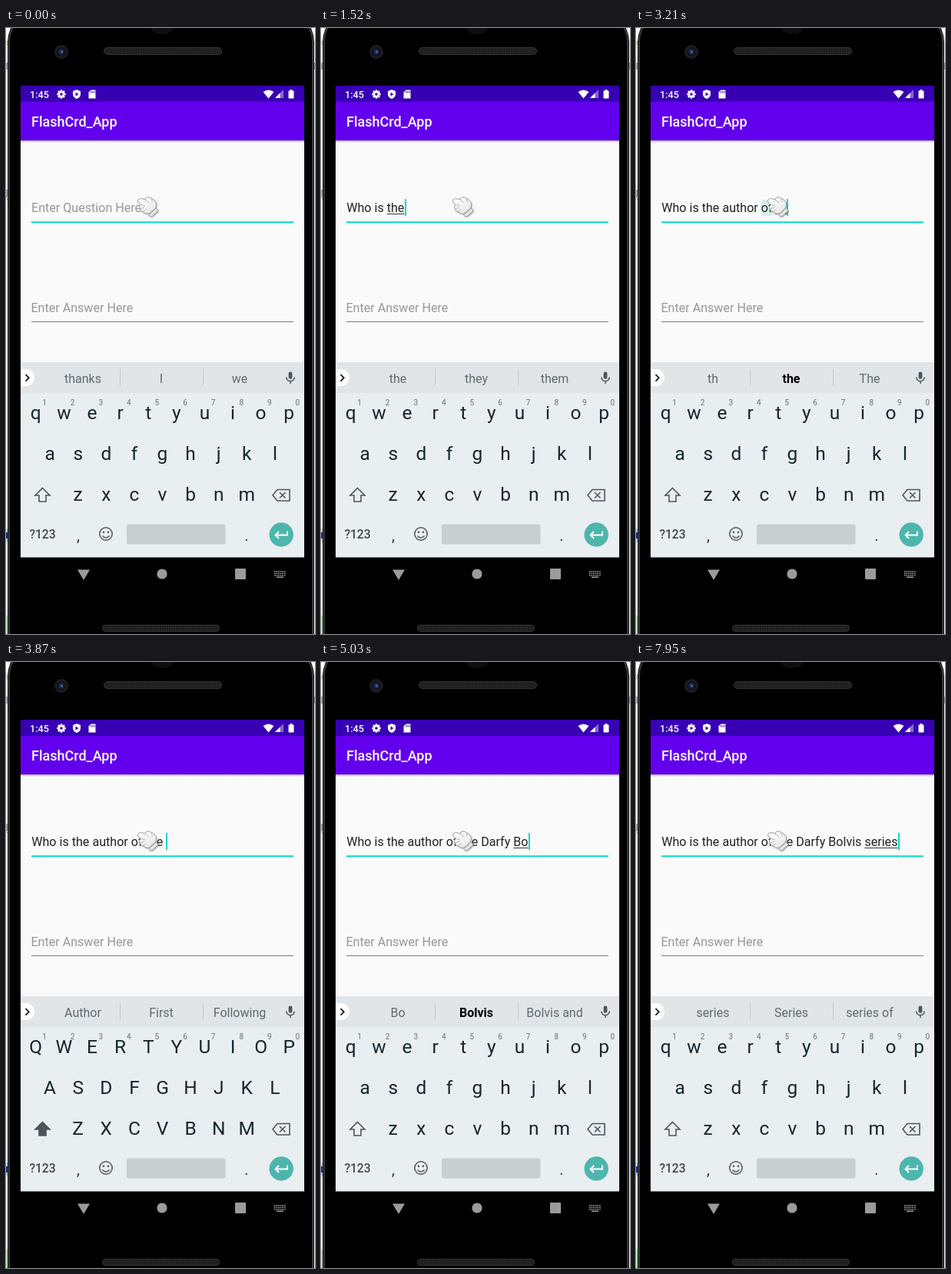
Write an HTML page with a canvas that moves like this. It is 402 px wide and 787 px high and loops after 8000 ms.

```html
<!DOCTYPE html>
<html lang="en">
<head>
<meta charset="utf-8">
<title>Flash card entry</title>
<style>
html, body { margin: 0; width: 100%; height: 100%; overflow: hidden; background: #fff; }
canvas { display: block; width: 402px; height: 787px; }
</style>
</head>
<body>
<canvas id="stage"></canvas>
<script>
const W = 402, H = 787, LOOP = 8000;
const cv = document.getElementById('stage');
const dpr = window.devicePixelRatio || 1;
cv.width = W * dpr;
cv.height = H * dpr;
const c = cv.getContext('2d');
const FONT = 'Roboto, "Noto Sans", sans-serif';
const TEXT_X = 33.2, TEXT_SIZE = 16.1;
const MID = 203.5, PITCH = 36.6;

// time, typed text, three suggestions ("*" marks the bold one)
const ASK = 'Who is the author ';
const OF = ASK + 'of the ';
const BOOK = OF + 'Darfy ';
const FULL = BOOK + 'Bolvis ';
const STEPS = [
  [0, '', 'thanks', 'I', 'we'],
  [160, 'W', 'W', 'We', 'What'],
  [460, 'Wh', 'Wh', '*What', 'Who'],
  [740, 'Who', 'Who', 'Who is', "Who's"],
  [860, 'Who ', 'are', 'is', 'I'],
  [1010, 'Who is', 'is', 'is the', 'is it'],
  [1140, 'Who is ', 'the', 'this', 'your'],
  [1270, 'Who is t', 't', '*the', 'this'],
  [1400, 'Who is the', 'the', 'they', 'them'],
  [1540, 'Who is the ', 'best', 'first', 'person'],
  [1670, 'Who is the a', 'a', 'at', 'and'],
  [1820, 'Who is the au', 'au', '*author', 'author of'],
  [2250, 'Who is the aut', 'aut', '*author', 'author of'],
  [2400, 'Who is the auth', 'auth', '*author', 'author of'],
  [2540, 'Who is the autho', 'autho', '*author', 'author of'],
  [2680, ASK, 'of', 'and', 'is'],
  [2810, ASK + 'o', 'o', '*of', 'or'],
  [2940, ASK + 'of', 'of', 'of the', 'or'],
  [3080, ASK + 'of t', 't', '*the', 'this'],
  [3210, ASK + 'of th', 'th', '*the', 'The'],
  [3330, ASK + 'of the', 'the', 'they', 'The'],
  [3450, OF, 'author', 'first', 'following'],
  [3870, OF, 'Author', 'First', 'Following'],
  [4010, OF + 'D', 'D', '*Do', 'Did'],
  [4290, OF + 'Dar', 'Dar', '*Darkest', 'Dark'],
  [4440, OF + 'Darf', 'Darf', '*Darfy', 'Dark'],
  [4590, OF + 'Darfy', 'Darfy', "Darfy's", 'Darfy Bolvis'],
  [4740, BOOK, 'Bolvis', 'and', 'is'],
  [4880, BOOK + 'B', 'B', '*Bolvis', 'But'],
  [5030, BOOK + 'Bo', 'Bo', '*Bolvis', 'Bolvis and'],
  [5800, BOOK + 'Bolv', 'Bolv', '*Bolvis', 'Bolvis and'],
  [6080, BOOK + 'Bolvi', 'Bolvi', '*Bolvis', 'Bolvis book'],
  [6280, BOOK + 'Bolvis', 'Bolvis', "Bolvis'", 'Bolts'],
  [6690, FULL, 'and', 'series', 'book'],
  [6840, FULL + 'se', 'se', '*series', 'see'],
  [7120, FULL + 'ser', 'ser', '*series', 'series of'],
  [7680, FULL + 'seri', 'seri', '*series', 'series of'],
  [7820, FULL + 'serie', 'serie', '*series', 'series of'],
  [7950, FULL + 'series', 'series', 'Series', 'series of']
];
const during = (t, a, b) => t >= a && t < b;

function box(x, y, w, h, color, r = 0) {
  c.fillStyle = color;
  c.beginPath();
  c.roundRect(x, y, w, h, r);
  c.fill();
}
function disc(x, y, r, color) {
  c.fillStyle = color;
  c.beginPath();
  c.arc(x, y, r, 0, 7);
  c.fill();
}
function poly(points, color) {
  c.fillStyle = color;
  c.beginPath();
  points.forEach(p => c.lineTo(p[0], p[1]));
  c.fill();
}
function stroke(d, color, width) {
  c.strokeStyle = color;
  c.lineWidth = width;
  c.stroke(new Path2D(d));
}
function text(s, x, y, size, color, align = 'left', weight = 400) {
  c.font = `${weight} ${size}px ${FONT}`;
  c.textAlign = align;
  c.fillStyle = color;
  c.fillText(s, x, y);
}
function textWidth(s) {
  c.font = `400 ${TEXT_SIZE}px ${FONT}`;
  return c.measureText(s).width;
}

function speaker(x, y, w, h) {
  box(x, y, w, h, '#353535', h / 2);
  box(x + 1, y + 1, w - 2, h - 2, '#1e1e1e', h / 2 - 1);
  for (let i = x + 5; i < x + w - 4; i += 3) box(i, y + 2, 1, h - 4, '#282828');
}

function phone() {
  box(0, 0, W, H, '#fff');
  box(0, 45, 5, 9, '#a9a9a9');
  box(0, 210, 5, 9, '#a9a9a9');
  box(398, 45, 4, 9, '#a9a9a9');
  stroke('M3 16L0 20L3 23M3 217L0 220L3 224', '#d49a4a', 1);
  box(0, 650, 4, 18, '#b9d3f5');
  box(0, 655, 2, 8, '#22339a');
  box(0, 763, 4, 24, '#b5e6b0');
  box(2, -22, 399, 860, '#1b1b1b', 40);
  box(3, -21, 397, 860, '#3a3a3a', 39);
  box(5, -20, 393, 860, '#000', 38);
  c.fillStyle = '#0e0e0e';
  c.beginPath();
  c.ellipse(203, 0, 14, 8, 0, 0, Math.PI);
  c.fill();
  disc(72, 31, 9, '#1d1e22');
  disc(72, 31, 6.5, '#11141d');
  disc(72, 31, 3.4, '#1d2a52');
  disc(72.5, 31, 1.4, '#4f68a8');
  speaker(127, 25, 154, 10);
  speaker(125, 775, 153, 9);
}

function statusBar() {
  box(19, 75, 369, 21, '#3700b3');
  text('1:45', 31, 90.5, 12.6, '#fff', 'left', 500);
  for (let i = 0; i < 8; i++) {
    c.save();
    c.translate(72, 86);
    c.rotate(i * Math.PI / 4);
    box(-1.3, -5.7, 2.6, 3, '#fff');
    c.restore();
  }
  disc(72, 86, 4.2, '#fff');
  disc(72, 86, 1.8, '#3700b3');
  c.fillStyle = '#fff';
  c.fill(new Path2D('M92 80L97 82V86Q97 90 92 92Q87 90 87 86V82Z'));
  poly([[90.5, 83.5], [94.5, 86], [90.5, 88.5]], '#3700b3');
  poly([[107.5, 83.5], [110.5, 80.5], [116.5, 80.5], [116.5, 91.5], [107.5, 91.5]], '#fff');
  [110.2, 112.4, 114.6].forEach(x => box(x, 82, 1, 2.6, '#3700b3'));
  c.fillStyle = '#fff';
  c.fill(new Path2D('M341.5 91.5L334.5 83Q341.5 78 348.5 83Z'));
  poly([[361, 80], [361, 91], [350, 91]], '#8767d2');
  poly([[356.5, 84.5], [356.5, 91], [350, 91]], '#fff');
  box(367.5, 81.5, 7, 10, '#fff', 0.8);
  box(369.5, 80, 3, 2, '#fff');
}

function page(t, typed) {
  box(19, 96, 369, 592, '#fafafa');
  box(19, 96, 369, 50, '#6200ee');
  text('FlashCrd_App', 33, 128, 18, '#fff', 'left', 500);
  const g = c.createLinearGradient(0, 146, 0, 149);
  g.addColorStop(0, 'rgba(0,0,0,.3)');
  g.addColorStop(1, 'rgba(0,0,0,0)');
  box(19, 146, 369, 3, g);

  box(33, 251.2, 341, 2, '#03dac5');
  box(33, 381, 341, 1, '#7d7d7d');
  text('Enter Answer Here', 32.4, 369.3, TEXT_SIZE, '#979797');

  if (!typed) {
    text('Enter Question Here', 33, 239.3, TEXT_SIZE, '#979797');
    return;
  }
  if (during(t, 3080, 3330)) {
    const x = TEXT_X + textWidth(ASK);
    box(x, 223, textWidth('of'), 21, '#d5eeed');
  }
  text(typed, TEXT_X, 239.3, TEXT_SIZE, '#212121');
  const word = typed.slice(typed.lastIndexOf(' ') + 1);
  const end = textWidth(typed);
  if (word) {
    const from = textWidth(typed.slice(0, -word.length));
    box(TEXT_X + from, 241, end - from, 1, '#333');
  }
  if (!during(t, 5530, 5800)) box(Math.round(33.5 + end), 222, 2, 22, '#03dac5');
}

function letters(row, y, upper) {
  const left = MID - (row.length - 1) / 2 * PITCH;
  [...row].forEach((k, i) =>
    text(upper ? k.toUpperCase() : k, left + i * PITCH, y, 24.5, '#14262e', 'center'));
}

function keyboard(hints, upper) {
  const ink = '#4b565c';
  box(19, 434, 369, 253.5, '#e9eef1');
  box(19, 434, 369, 40, '#e1e5e8');
  box(19, 443, 18, 22, '#fff', [0, 11, 11, 0]);
  stroke('M25.5 450L29.8 454.3L25.5 458.6', '#111', 1.7);
  box(148, 443, 1, 22, '#c3c8cb');
  box(256, 443, 1, 22, '#c3c8cb');
  hints.forEach((s, i) => {
    const bold = s[0] === '*';
    text(bold ? s.slice(1) : s, 100 + i * 102, 460.6, 16, bold ? '#000' : '#60696e', 'center', bold ? 700 : 400);
  });
  box(367.6, 446.5, 4.8, 9.5, ink, 2.4);
  stroke('M364.8 453.5A5.2 5.2 0 0 0 375.2 453.5M370 458.5V462', ink, 1.5);

  letters('qwertyuiop', 508.3, upper);
  letters('asdfghjkl', 560.6, upper);
  letters('zxcvbnm', 614, upper);
  for (let i = 0; i < 10; i++)
    text((i + 1) % 10, 50 + i * PITCH, 490, 10, '#667177', 'center');

  const shift = 'M47.5 597.5L57 607H52V615H43V607H38Z';
  if (upper) {
    c.fillStyle = ink;
    c.fill(new Path2D(shift));
  }
  stroke(shift, ink, 1.6);
  stroke('M353 599.5H369V614H353L347 606.7ZM356 603L363.5 610.5M363.5 603L356 610.5', ink, 1.6);

  text('?123', 47.5, 663.3, 15.6, '#3d494f', 'center', 500);
  text(',', 94, 666, 20, '#26343a', 'center');
  text('.', 313, 666, 20, '#26343a', 'center');
  stroke('M138.2 657A8.2 8.2 0 1 1 121.8 657A8.2 8.2 0 1 1 138.2 657ZM125.5 659.5Q130 664.5 134.5 659.5', ink, 1.5);
  disc(127, 654.7, 1.3, ink);
  disc(133, 654.7, 1.3, ink);
  box(157, 644.5, 128.5, 26, '#c9ced1', 2.5);
  disc(358.2, 658, 15.7, '#4db6ac');
  stroke('M366 653.5V658.5H351M355 654L350.5 658.5L355 663', '#fff', 1.9);
}

function navBar() {
  const gray = '#9b9b9b';
  box(19, 687.5, 369, 45, '#000');
  poly([[93, 703.5], [109, 703.5], [101, 717]], gray);
  disc(203, 709, 6.6, gray);
  box(298, 702, 14, 14, gray, 1);
  for (let r = 0; r < 3; r++)
    for (let i = 0; i < 6; i++) box(349 + i * 2.6, 705 + r * 2.6, 1.6, 1.6, gray);
  box(352, 712.6, 9, 1.5, gray);
}

// Pointing glove
function hand() {
  c.save();
  c.lineJoin = 'round';
  const glove = new Path2D('M172 223Q174 220.5 178 222L181 223Q181.500 219.500 185 219.700Q188 219.800 189 221.700Q192 221.500 193 224.500Q196 226 195.500 229.500L194.500 235L187 241.500Q181 242 178 238.500Q174.500 238.500 174.500 235Q172.500 233 174 231L175.500 229.500L172.500 227Q170.500 225 172 223Z');
  const cuff = new Path2D('M185.500 241.500L194.500 234Q197.500 234.500 198 237.500L189.500 245Q186 245 185.500 241.500Z');
  c.shadowColor = 'rgba(0,0,0,.4)';
  c.shadowBlur = 2 * dpr;
  c.shadowOffsetX = c.shadowOffsetY = dpr;
  const shade = c.createLinearGradient(176, 220, 192, 244);
  shade.addColorStop(0, '#fff');
  shade.addColorStop(1, '#e2e2e2');
  c.fillStyle = shade;
  c.fill(glove);
  c.fill(cuff);
  c.shadowColor = 'transparent';
  c.strokeStyle = '#a2a2a2';
  c.lineWidth = 1;
  c.stroke(glove);
  c.stroke(cuff);
  stroke('M175.5 229.5L181 231M181 223L186 227M189 222L190.5 226M174.500 235L180 233M178 238.500L182.500 235.500', '#b4b4b4', 1);
  c.restore();
}

function draw(t) {
  const [at, typed, ...hints] = STEPS.findLast(s => s[0] <= t);
  c.setTransform(dpr, 0, 0, dpr, 0, 0);
  phone();
  statusBar();
  page(t, typed);
  keyboard(hints, at === 3870);
  navBar();
  hand();
}

const start = performance.now();
function tick() {
  draw((performance.now() - start) % LOOP);
  requestAnimationFrame(tick);
}
tick();
</script>
</body>
</html>
```
